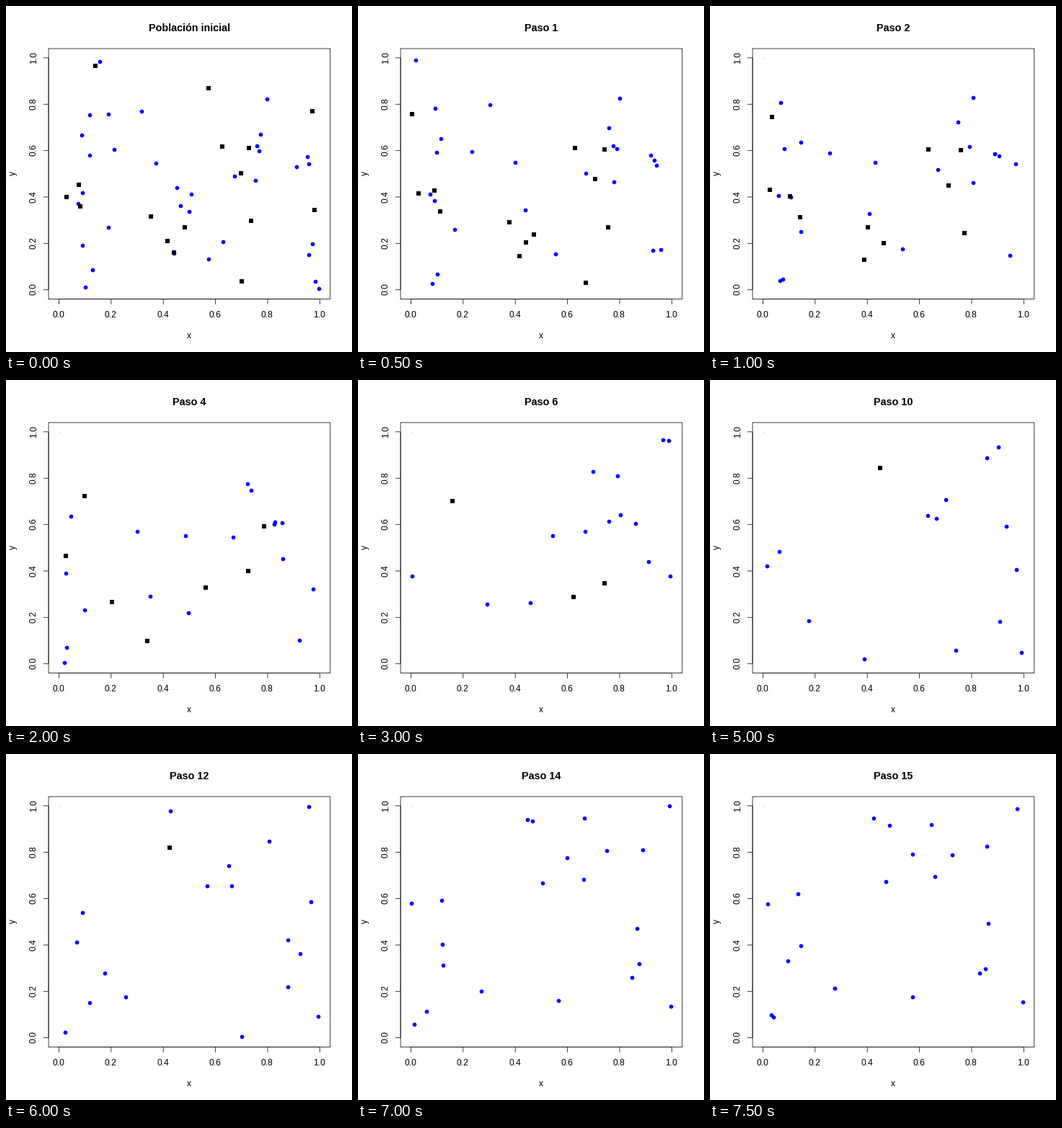
A matplotlib script that plays this animation: 480 px wide and 480 px high, repeating every 8000 ms.

```python
import random

import numpy as np
import matplotlib.pyplot as plt
from matplotlib.animation import FuncAnimation

SIZE, DPI, STEPS = 480, 80, 16
PT = 72 / DPI                                  # one pixel in points
LEFT, RIGHT, TOP, BOTTOM = 59.04, 449.76, 59.04, 406.56
X0, Y1, W, H = 73.5, 71.9, 361.8, 321.8        # unit square in pixels
TICK, SPEED = 7.2, 0.031

rng = random.Random(11)


def stray(birth, death):
    """An agent with a random place and a random steady drift."""
    return (birth, death, X0 + W * rng.random(), Y1 + H * rng.random(),
            W * rng.uniform(-SPEED, SPEED), H * rng.uniform(-SPEED, SPEED))


# Long-lived agents: birth, x, y, vx, vy
lasting = [
    (0, 347.5, 193.5, 6.3, 0.95), (0, 418, 209, -11.6, -2.13),
    (0, 420, 219, -9.27, -5.33), (0, 316.5, 236, -0.28, -4.4),
    (0, 346, 242, 9.47, 1.6), (0, 120, 366, -9.75, 6.4),
    (0, 242, 277, -10.5, 5.68), (3, 330, 163, 9.95, -10),
    (3, 421, 298.5, 5.2, -8.7), (5, 430.7, 90.7, 0.33, -6.9),
    (7, 89.5, 242, -8.7, 7), (7, 193, 367.3, 7, 6.72),
]
blue = [(birth, STEPS, *track) for birth, *track in lasting]
blue += [stray(0, int(9 * (i / 27) ** 2)) for i in range(27)]
blue += [stray(10 + i * 5 // 9, STEPS) for i in range(9)]

black = [(0, 9, 425, 146.3, 11.35, 3.7), (3, 9, 266, 281.5, 11, 6.5),
         (8, 12, 245, 114, -4.5, 4)]
black += [stray(0, int(6.5 * i / 15)) for i in range(15)]


def positions(group, step):
    """Places of the living agents, drifting on a torus."""
    pts = [(X0 + (x + vx * (step - birth) - X0) % W,
            Y1 + (y + vy * (step - birth) - Y1) % H)
           for birth, death, x, y, vx, vy in group if birth <= step <= death]
    return np.array(pts).reshape(-1, 2)


plt.rcParams["font.family"] = "Liberation Sans"
fig = plt.figure(figsize=(SIZE / DPI, SIZE / DPI), dpi=DPI, facecolor="white")
ax = fig.add_axes([0, 0, 1, 1])
ax.set(xlim=(0, SIZE), ylim=(SIZE, 0))
ax.axis("off")


def line(xs, ys):
    ax.plot(xs, ys, color="black", lw=0.75 * PT, snap=False,
            solid_capstyle="butt", solid_joinstyle="miter")


def label(x, y, text, px=12, **kw):
    return ax.text(x, y, text, fontsize=px * PT, ha="center", va="baseline",
                   rotation_mode="anchor", **kw)


line([LEFT, RIGHT, RIGHT, LEFT, LEFT], [TOP, TOP, BOTTOM, BOTTOM, TOP])
line([X0, X0 + W], [BOTTOM, BOTTOM])
line([LEFT, LEFT], [Y1, Y1 + H])
for k in range(6):
    x, y = X0 + W * k / 5, Y1 + H * (1 - k / 5)
    line([x, x], [BOTTOM, BOTTOM + TICK])
    line([LEFT - TICK, LEFT], [y, y])
    label(x - 0.7, 432, f"{k / 5:.1f}")
    label(42, y - 0.7, f"{k / 5:.1f}", rotation=90)
label(253.7, 461, "x")
label(13, 232, "y", rotation=90)
title = label(254.4, 35, "", 14.4, weight="bold")


def marks(marker, px, color, **kw):
    return ax.scatter([], [], s=(px * PT) ** 2, marker=marker, c=color,
                      linewidths=0, zorder=3, **kw)


circles = marks("o", 5.7, "#0000ff", snap=False)
squares = marks("s", 6, "black", antialiased=False)
speck = marks("s", 1, "#b0b0b0", antialiased=False)
speck.set_offsets([(73.5, 71.5)])


def draw(step):
    title.set_text(f"Paso {step}" if step else "Población inicial")
    circles.set_offsets(positions(blue, step))
    squares.set_offsets(np.round(positions(black, step)))
    speck.set_visible(step > 0)
    return title, circles, squares, speck


anim = FuncAnimation(fig, draw, frames=STEPS, interval=500, repeat=True)
plt.show()
```
